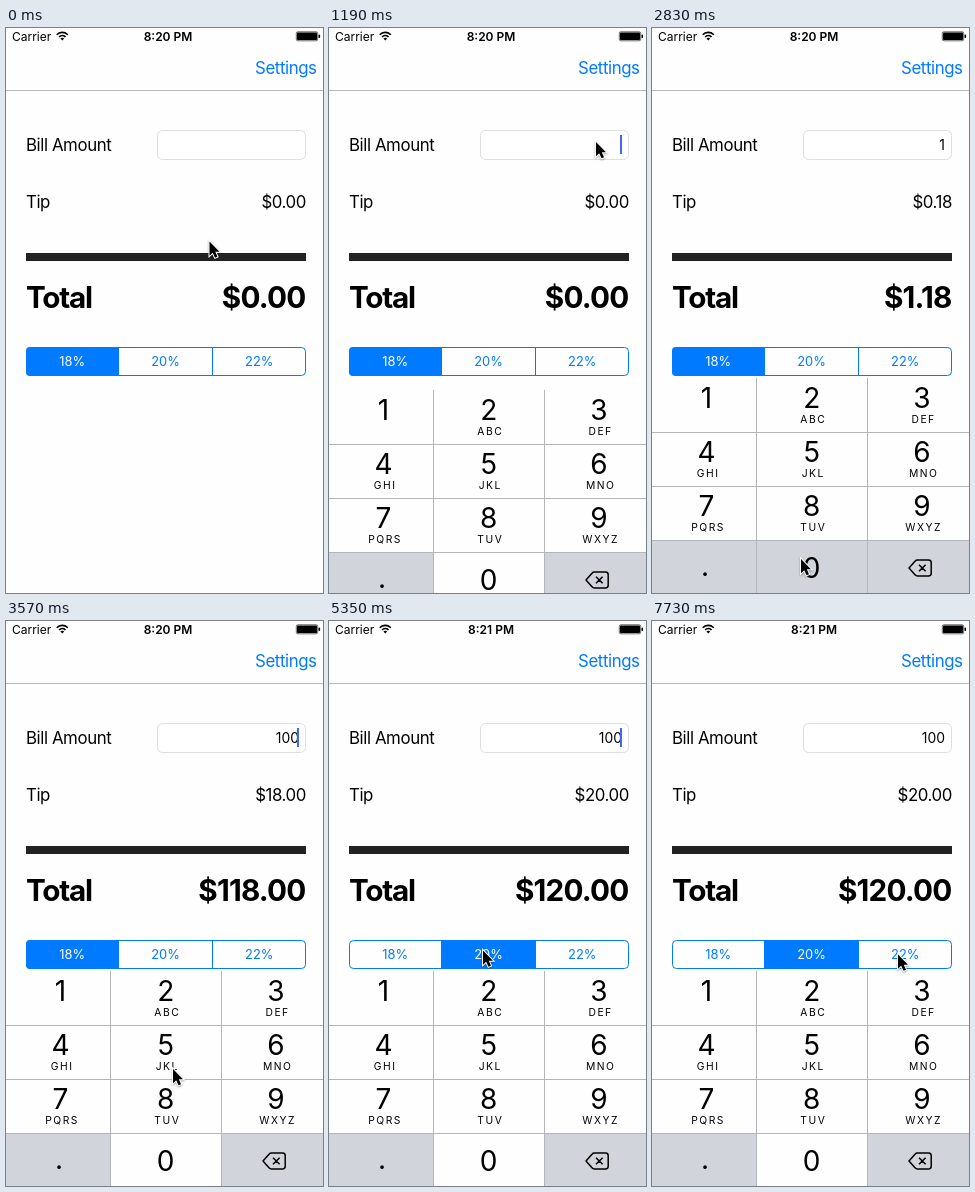
Write an HTML page with a canvas that moves like this. It is 317 px wide and 565 px high and loops after 8 s.

```html
<!DOCTYPE html>
<html lang="en">
<head>
<meta charset="utf-8">
<title>Tip calculator</title>
<style>
  html, body { margin: 0; width: 100%; height: 100%; overflow: hidden; background: #fefefe; }
  canvas { display: block; width: 317px; height: 565px; }
</style>
</head>
<body>
<canvas id="stage"></canvas>
<script>
const W = 317, H = 565, LOOP = 8000, TICK = 148.6;
const BLUE = '#007aff', INK = '#000', PAPER = '#fefefe', LINE = '#b4b5b8', KEY_GREY = '#d1d4db';

const canvas = document.getElementById('stage');
const ratio = window.devicePixelRatio || 1;
canvas.width = W * ratio;
canvas.height = H * ratio;
const ctx = canvas.getContext('2d');
ctx.scale(ratio, ratio);

const typing = [[13, '1'], [20, '10'], [21, '100']];
const caretOn = [7, 13, 20, 28, 34, 41, 48];
const caretDim = [10, 16, 25, 30, 38, 44, 51];
const slide = { 6: 190, 7: 75, 8: 12, 9: 2 };
const SELECT_TICK = 33, CLOCK_TICK = 32, PRESS_TICK = 19;
const pointerPath = [
  [0, 203.5, 213.5], [4, 267, 114], [8, 267, 114], [11, 50, 366], [13, 50, 366],
  [18, 149, 531], [23, 149, 531], [24, 167, 448], [26, 161, 330], [29, 161, 330],
  [36, 154, 329.5], [37, 154, 329.5], [42, 246, 333.5]
];

function text(str, x, y, size, { weight = 400, color = INK, align = 'left', spacing = 0 } = {}) {
  ctx.font = `${weight} ${size}px Inter, "Liberation Sans", sans-serif`;
  ctx.letterSpacing = spacing + 'px';
  ctx.textAlign = align;
  ctx.fillStyle = color;
  ctx.fillText(str, x, y);
}

function rect(x, y, w, h, color) {
  ctx.fillStyle = color;
  ctx.fillRect(x, y, w, h);
}

function roundRect(x, y, w, h, r) {
  ctx.beginPath();
  ctx.roundRect(x, y, w, h, r);
}

function polygon(points) {
  ctx.beginPath();
  points.forEach(([x, y]) => ctx.lineTo(x, y));
  ctx.closePath();
}

function pointerAt(n) {
  const i = pointerPath.findIndex(p => p[0] > n);
  if (i < 0) return pointerPath[pointerPath.length - 1].slice(1);
  const [n0, x0, y0] = pointerPath[i - 1], [n1, x1, y1] = pointerPath[i];
  const u = (n - n0) / (n1 - n0), e = u * u * (3 - 2 * u);
  return [x0 + (x1 - x0) * e, y0 + (y1 - y0) * e];
}

function caretAlpha(n) {
  const i = caretOn.findLastIndex(start => n >= start);
  if (i < 0 || n > caretDim[i]) return 0;
  return n === caretDim[i] ? 0.5 : 1;
}

function drawStatusBar(n) {
  text('Carrier', 6, 12.5, 12);
  text(n >= CLOCK_TICK ? '8:21 PM' : '8:20 PM', 162, 12.5, 12, { weight: 600, align: 'center' });

  ctx.strokeStyle = INK;
  ctx.lineWidth = 1.6;
  for (const r of [4.4, 7.6]) {
    ctx.beginPath();
    ctx.arc(56.3, 12, r, -Math.PI * 0.76, -Math.PI * 0.24);
    ctx.stroke();
  }
  ctx.fillStyle = INK;
  ctx.beginPath();
  ctx.moveTo(56.3, 12.4);
  ctx.arc(56.3, 12.4, 2.6, -Math.PI * 0.76, -Math.PI * 0.24);
  ctx.fill();

  ctx.lineWidth = 0.6;
  roundRect(290.3, 3.8, 21.4, 9, 1.6);
  ctx.stroke();
  roundRect(291, 4.5, 20, 7.6, 0.8);
  ctx.fill();
  roundRect(312.5, 6.6, 1.6, 3.4, 0.8);
  ctx.fill();
}

function drawForm(n) {
  const label = { spacing: -0.41 };
  const value = { spacing: -0.41, align: 'right' };
  const heading = { weight: 700, spacing: -1.25 };
  const typed = typing.findLast(([start]) => n >= start)?.[1] ?? '';
  const bill = Number(typed);
  const tip = bill * (n >= SELECT_TICK ? 0.2 : 0.18);
  const money = amount => '$' + amount.toFixed(2);

  text('Settings', 249, 46, 16.84, { ...label, color: BLUE });
  rect(0, 62, W, 1, '#b9b9b9');

  text('Bill Amount', 20, 122.6, 16.84, label);
  ctx.strokeStyle = '#dedede';
  ctx.lineWidth = 1;
  roundRect(151.5, 102.5, 148, 29, 5);
  ctx.fillStyle = '#fff';
  ctx.fill();
  ctx.stroke();
  text(typed, 293, 122, 13.9, { align: 'right' });
  ctx.globalAlpha = caretAlpha(n);
  rect(291, 107, 2, 19, '#4169e8');
  ctx.globalAlpha = 1;

  text('Tip', 20, 179.6, 16.84, label);
  text(money(tip), 300, 179.6, 16.84, value);
  rect(20, 225, 280, 8, '#222');
  text('Total', 20, 280.3, 29.7, heading);
  text(money(bill + tip), 299.5, 280.3, 29.7, { ...heading, spacing: -0.8, align: 'right' });
}

function drawSegments(n) {
  const edges = [20, 112.5, 206.5, 300];
  const selected = n >= SELECT_TICK ? 1 : 0;
  ctx.save();
  roundRect(20, 319, 280, 29, 4);
  ctx.clip();
  rect(edges[selected], 319, edges[selected + 1] - edges[selected], 29, BLUE);
  ctx.restore();
  ctx.strokeStyle = BLUE;
  ctx.lineWidth = 1;
  roundRect(20.5, 319.5, 279, 28, 4);
  ctx.stroke();
  rect(112, 319, 1, 29, BLUE);
  rect(206, 319, 1, 29, BLUE);
  ['18%', '20%', '22%'].forEach((name, i) => {
    const color = i === selected ? '#fff' : BLUE;
    text(name, (edges[i] + edges[i + 1]) / 2, 338, 12.9, { color, align: 'center' });
  });
}

function drawBackspace() {
  ctx.strokeStyle = INK;
  ctx.lineWidth = 1.5;
  ctx.lineJoin = 'round';
  ctx.beginPath();
  ctx.moveTo(257, 540);
  ctx.lineTo(263, 533.2);
  ctx.quadraticCurveTo(264, 532, 265.5, 532);
  ctx.lineTo(276.5, 532);
  ctx.quadraticCurveTo(279.2, 532, 279.2, 534.7);
  ctx.lineTo(279.2, 545.3);
  ctx.quadraticCurveTo(279.2, 548, 276.5, 548);
  ctx.lineTo(265.5, 548);
  ctx.quadraticCurveTo(264, 548, 263, 546.8);
  ctx.closePath();
  ctx.moveTo(267, 536.7);
  ctx.lineTo(273.6, 543.3);
  ctx.moveTo(273.6, 536.7);
  ctx.lineTo(267, 543.3);
  ctx.stroke();
}

function drawKeypad(n) {
  if (n < 6) return;
  const centers = [54.5, 159.7, 270];
  const letters = ['', 'ABC', 'DEF', 'GHI', 'JKL', 'MNO', 'PQRS', 'TUV', 'WXYZ'];
  ctx.save();
  ctx.translate(0, slide[n] || 0);
  rect(0, 350, W, 215, PAPER);
  rect(0, 512, 105, 53, KEY_GREY);
  rect(215, 512, 102, 53, KEY_GREY);
  if (n === PRESS_TICK) rect(105, 512, 110, 53, KEY_GREY);
  for (const y of [404, 458, 512]) rect(0, y, W, 1, LINE);
  for (const x of [104, 215]) rect(x, 350, 1, 215, LINE);

  letters.forEach((group, i) => {
    const x = centers[i % 3], top = 350 + 54 * Math.floor(i / 3);
    text(String(i + 1), x, top + 30, 28, { align: 'center' });
    text(group, x + 1.6, top + 45.3, 10.3, { align: 'center', spacing: 1.5 });
  });
  text('0', centers[1], 549.5, 28, { align: 'center' });
  text('.', 53, 547.5, 28, { align: 'center' });
  drawBackspace();
  ctx.restore();
}

function drawPointer(n) {
  ctx.save();
  ctx.translate(...pointerAt(n));
  polygon([[0, 0], [0, 14.2], [3.2, 11.2], [5.5, 16.3], [8, 15.2], [5.8, 10.3], [10, 10.3]]);
  ctx.lineJoin = 'miter';
  ctx.lineWidth = 2;
  ctx.strokeStyle = '#fff';
  ctx.shadowColor = 'rgba(0,0,0,0.35)';
  ctx.shadowBlur = 2 * ratio;
  ctx.shadowOffsetY = ratio;
  ctx.stroke();
  ctx.shadowColor = 'transparent';
  ctx.fillStyle = INK;
  ctx.fill();
  ctx.restore();
}

function render(now) {
  const n = Math.floor((now % LOOP + 3) / TICK);
  rect(0, 0, W, H, PAPER);
  drawStatusBar(n);
  drawForm(n);
  drawSegments(n);
  drawKeypad(n);
  drawPointer(n);
}

let begin;
function loop(now) {
  begin ??= now;
  render(now - begin);
  requestAnimationFrame(loop);
}
render(0);
requestAnimationFrame(loop);
</script>
</body>
</html>
```
